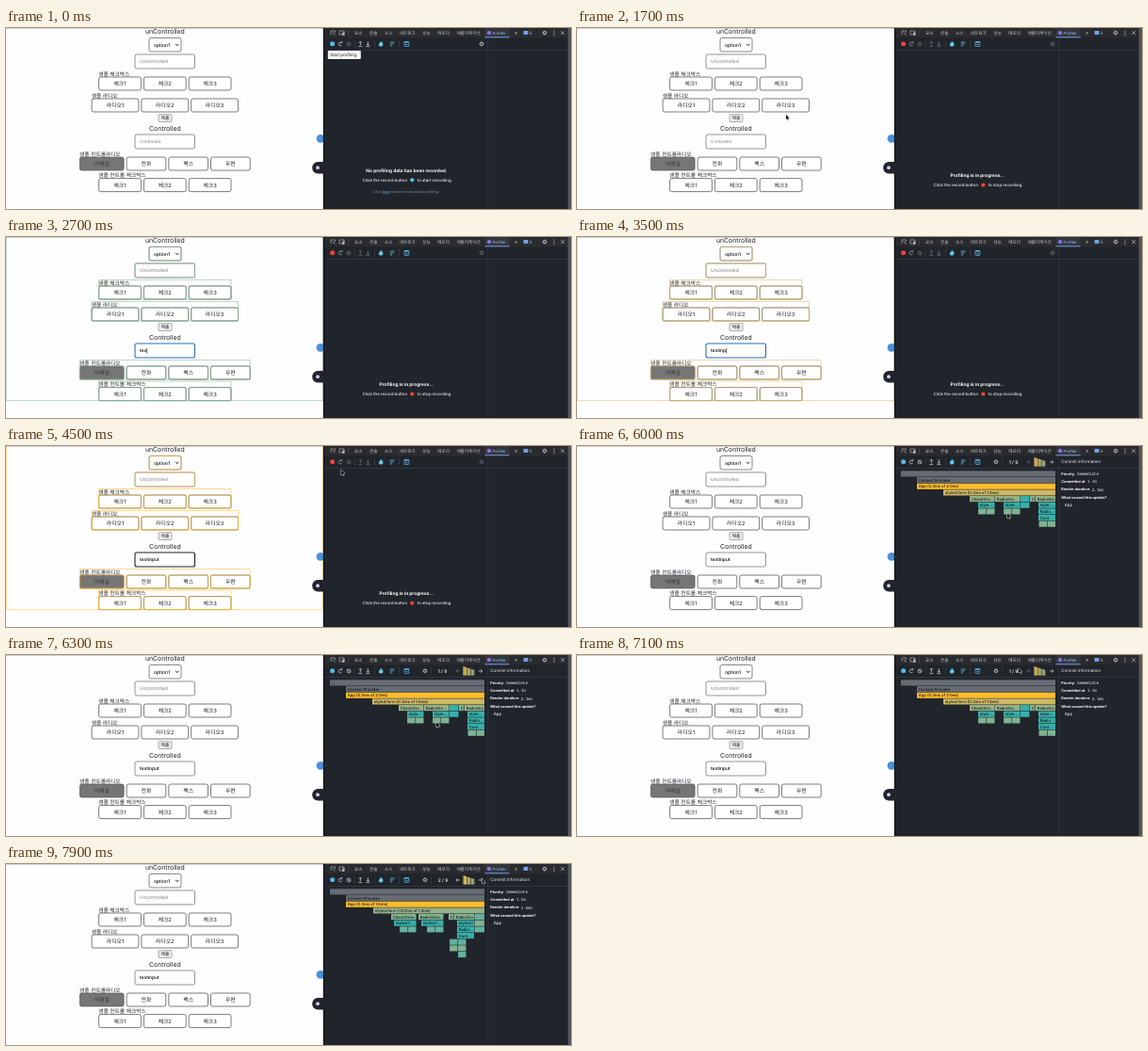
These frames come from a looping animation (600x192 px, 8 s). An HTML page with a canvas:

```html
<!DOCTYPE html>
<html lang="ko">
<head>
<meta charset="utf-8">
<title>Profiler demo</title>
<style>
html, body { margin: 0; width: 100%; height: 100%; overflow: hidden; background: #fff; }
canvas { display: block; width: 600px; height: 192px; }
</style>
</head>
<body>
<canvas id="stage"></canvas>
<script>
const W = 600, H = 192, LOOP = 8000;
const START = 800, TYPE = 2250, STEP = 200, BLUR = 5050, RESULT = 5500, NEXT = 7700;
const WORD = 'textinput', MID = 168.8;
const HEAT = ['#37afa9', '#63b19e', '#80b393', '#97b488', '#abb67d',
  '#beb771', '#cfb965', '#dfba57', '#efbb49', '#febc2c'];
const RED = '#ee4337', BLUE = '#55b8e6', CYAN = '#61c9ea', DIM = '#626973', LIGHT = '#c0c4ca';
const SANS = 'Inter, "Noto Sans CJK KR", "Noto Sans CJK", sans-serif';
const MONO = '"Noto Sans Mono", monospace';

const canvas = document.getElementById('stage');
const dpr = window.devicePixelRatio || 1;
canvas.width = W * dpr;
canvas.height = H * dpr;
const c = canvas.getContext('2d');

function fill(x, y, w, h, color) {
  c.fillStyle = color;
  c.fillRect(x, y, w, h);
}

function line(color, width, ...pts) {
  c.strokeStyle = color;
  c.lineWidth = width;
  c.beginPath();
  for (let i = 0; i < pts.length; i += 2) c.lineTo(pts[i], pts[i + 1]);
  c.stroke();
}

function dot(x, y, r, color) {
  c.fillStyle = color;
  c.beginPath();
  c.arc(x, y, r, 0, 7);
  c.fill();
}

function ring(x, y, r, color, width = 0.8, from = 0, to = 6.29) {
  c.strokeStyle = color;
  c.lineWidth = width;
  c.beginPath();
  c.arc(x, y, r, from, to);
  c.stroke();
}

function box([x, y, w, h], r, bg, edge, width = 0.7) {
  c.beginPath();
  c.roundRect(x, y, w, h, r);
  if (bg) { c.fillStyle = bg; c.fill(); }
  if (edge) { c.strokeStyle = edge; c.lineWidth = width; c.stroke(); }
}

// y is the vertical centre; returns the right edge
function text(s, x, y, size, color, { weight = 400, align = 'left', font = SANS } = {}) {
  c.font = `${weight} ${size}px ${font}`;
  c.fillStyle = color;
  c.textAlign = align;
  c.textBaseline = 'alphabetic';
  c.fillText(s, x, y + size * 0.36);
  return x + c.measureText(s).width;
}

const centred = { align: 'center' };

// A titled row of equal buttons centred on the page; a picked first button is wider
function group(title, y, w, names, picked = false) {
  const gap = 3, extra = picked ? 5 : 0;
  const total = names.length * (w + gap) - gap + extra;
  const left = MID - total / 2;
  const cells = names.map((name, i) => i ? [left + extra + i * (w + gap), y, w, 14] : [left, y, w + extra, 14]);
  return { title, y, names, picked, cells, frame: [left, y - 6.5, total, 20.5] };
}

const CHECKS = [1, 2, 3].map(i => '체크' + i);
const RADIOS = [1, 2, 3].map(i => '라디오' + i);
const GROUPS = [
  group('샘플 체크박스', 52, 44.8, CHECKS),
  group('샘플 라디오', 75, 49.8, RADIOS),
  group('샘플 컨트롤라디오', 137, 41.7, ['이메일', '전화', '팩스', '우편'], true),
  group('샘플 컨트롤 체크박스', 159.6, 44.8, CHECKS)
];
const SELECT = [152, 10.5, 34, 14.5];
const FREE = [137, 28, 63.5, 15];
const BOUND = [137, 113, 63.5, 15];

function page(t) {
  fill(0, 0, 337, H, '#fefdff');
  fill(0, 0, 337, 0.7, '#b9b9bc');
  text('unControlled', MID, 4, 6.9, '#222', centred);
  box(SELECT, 2, '#fff', '#555');
  text('option1', 157, 17.8, 5, '#111', { weight: 500 });
  line('#111', 1, 180.2, 17, 181.8, 18.6, 183.4, 17);
  box(FREE, 2, '#fff', '#666');
  text('Uncontrolled', 142, 35.7, 4.9, '#777');

  for (const g of GROUPS) {
    text(g.title, g.frame[0] - 0.3, g.y - 3.4, 5.7, '#222');
    g.cells.forEach((r, i) => {
      const on = g.picked && i === 0;
      box(r, 2, on ? '#767676' : '#fff', on ? '#555' : '#444');
      text(g.names[i], r[0] + r[2] / 2, r[1] + r[3] / 2, 5.8, on ? '#333' : '#1a1a1a', centred);
    });
  }

  box([162, 91.7, 14, 7.8], 1, '#efefef', '#777', 0.6);
  text('제출', 169, 95.7, 4.8, '#111', centred);
  text('Controlled', MID, 106.3, 6.9, '#222', centred);

  const count = t < TYPE ? 0 : Math.min(WORD.length, 1 + Math.floor((t - TYPE) / STEP));
  const focus = t >= 2100 && t < 4300;
  const dark = t >= 4300 && t < BLUR;
  box(BOUND, 2, '#fff', focus ? '#2a6fb5' : dark ? '#222' : '#666', focus || dark ? 1.1 : 0.7);
  let end = 142;
  if (count) end = text(WORD.slice(0, count), 142, 120.7, 4.9, '#000', { weight: 500 });
  else text('Controlled', 142, 120.7, 4.5, '#777');
  if (focus) fill(end + 0.2, 118, 0.6, 5.4, '#111');

  if (count && t < 4600) highlight(HEAT[count < WORD.length ? count - 1 : 9]);

  dot(334, 117.3, 4.4, '#4a90d9');
  fill(336.8, 0, 1.4, H, '#111317');
  box([325.2, 142, 14, 12.5], [6, 0, 0, 6], '#22232b');
  dot(331, 148.2, 1.9, '#d5d0f0');
}

function highlight(color) {
  c.globalAlpha = 0.75;
  for (const g of GROUPS) [g.frame, ...g.cells].forEach(r => box(r, 0, null, color));
  [SELECT, FREE, [0.3, -2, 336.2, 175.6]].forEach(r => box(r, 0, null, color));
  c.globalAlpha = 1;
}

function tabs() {
  fill(338, 0, 262, 10.5, '#292b2f');
  line('#aaa', 0.7, 345, 7, 345, 3, 349.5, 3, 349.5, 5);
  line('#aaa', 0.9, 346.8, 4.8, 349.5, 7.4);
  box([354, 3, 5, 4], 0, null, '#aaa');
  fill(357, 4.5, 2.5, 3.5, '#aaa');
  line('#555', 0.5, 363.5, 2, 363.5, 8.5);
  let x = 370;
  for (const s of '요소 콘솔 소스 네트워크 성능 메모리 애플리케이션'.split(' ')) {
    x = text(s, x, 5.2, 4.6, '#c9cbce') + 7.5;
  }
  fill(508.5, 0, 26, 10, '#32363d');
  dot(513, 5.2, 2.1, '#8f6fe0');
  text('Profiler', 516.5, 5.2, 4.2, '#9cc4f8');
  fill(508.5, 9.4, 26, 0.9, '#7cacf8');
  text('»', 540, 4.8, 5.5, '#c9cbce');
  box([549.5, 3, 5, 4], 0.7, '#6ea2f0');
  text('5', 556, 5.2, 4.4, '#c9cbce');
  gear(572, 5.2, LIGHT);
  [3, 5.2, 7.4].forEach(y => dot(582, y, 0.6, LIGHT));
  line(LIGHT, 0.7, 589.3, 3.2, 593, 7);
  line(LIGHT, 0.7, 593, 3.2, 589.3, 7);
}

function gear(x, y, color) {
  ring(x, y, 1.5, color, 0.9);
  for (let i = 0; i < 8; i++) {
    const a = i * Math.PI / 4, u = Math.cos(a), v = Math.sin(a);
    line(color, 0.7, x + u * 1.7, y + v * 1.7, x + u * 2.6, y + v * 2.6);
  }
}

function arrow(x, y, dir, color) {
  line(color, 0.8, x - 2 * dir, y, x + 2 * dir, y);
  line(color, 0.8, x + 0.3 * dir, y - 1.7, x + 2 * dir, y, x + 0.3 * dir, y + 1.7);
}

function toolbar(rec, result, commit) {
  const on = rec ? DIM : LIGHT, ban = result ? LIGHT : DIM;
  const reload = rec ? '#9298a0' : LIGHT;
  fill(338, 23.2, 262, 0.5, '#434851');
  fill(511.6, 10.5, 0.6, H, '#3a3f48');
  dot(346.6, 16.8, 2.5, rec ? RED : BLUE);
  ring(355, 17, 1.9, reload, 0.8, 0.4, 5.4);
  line(reload, 0.8, 354.9, 15.9, 356.8, 15.7, 356.8, 13.9);
  ring(364, 17, 2, ban);
  line(ban, 0.8, 362.6, 15.6, 365.4, 18.4);
  [370, 391, 417.5].forEach(x => fill(x, 13, 0.5, 8, '#434851'));
  for (const d of [1, -1]) {
    const x = 380.3 - 4 * d;
    line(on, 0.9, x, 14.3, x, 18.3);
    line(on, 0.8, x - 1.5, 16.3 - 0.7 * d, x, 16.3 - 2.2 * d, x + 1.5, 16.3 - 0.7 * d);
    line(on, 0.8, x - 2, 19.6, x + 2, 19.6);
  }
  c.fillStyle = CYAN;
  c.beginPath();
  c.moveTo(398.2, 14);
  c.bezierCurveTo(401.5, 16.5, 401, 19.6, 398.2, 19.6);
  c.bezierCurveTo(395.2, 19.6, 395.4, 17, 397, 15.8);
  c.fill();
  for (let i = 0; i < 3; i++) fill(407.7, 14.6 + i * 1.9, 5 - i * 1.3, 1, '#49a6b8');
  box([423, 14.5, 4.8, 5], 0.5, null, '#58a9d8', 0.8);
  fill(423, 14.3, 4.8, 1.5, '#58a9d8');
  fill(424.4, 17, 2, 1.2, '#58a9d8');

  gear(result ? 445 : 505, 16.8, on);
  if (!result) return;
  fill(451.5, 13, 0.5, 8, '#434851');
  text(`${commit} / 9`, 458.7, 17, 4.9, '#fff', { weight: 500 });
  arrow(480, 17, -1, commit > 1 ? LIGHT : DIM);
  for (let i = 0; i < 9; i++) {
    const h = 9.5 - i * 0.45;
    fill(485.5 + i * 1.35, 21.7 - h, 1.1, h, i === commit - 1 ? '#ffe28a' : HEAT[Math.max(4, 9 - i)]);
  }
  arrow(504, 17, 1, LIGHT);
}

function message(rec) {
  const y = rec ? 166.6 : 161.2, verb = rec ? 'stop' : 'start';
  const title = rec ? 'Profiling is in progress...' : 'No profiling data has been recorded.';
  text(title, 425.4, y - 10, 4.85, '#fff', { weight: 700, align: 'center' });
  text('Click the record button', 378.6, y, 4.35, '#eee', { weight: 500 });
  dot(431.3, y, 2.1, rec ? RED : BLUE);
  text(`to ${verb} recording.`, 436.8, y, 4.35, '#eee', { weight: 500 });
  if (rec) return;
  const a = text('Click ', 390, 173.8, 3.75, '#8b919b');
  const b = text('here', a, 173.8, 3.75, CYAN);
  line(CYAN, 0.4, a, 175.8, b, 175.8);
  text(' to learn more about profiling.', b, 173.8, 3.75, '#8b919b');
}

function cell(row, left, right, color, label) {
  const y = 26.4 + row * 6.66, w = right - left;
  fill(left, y, w, 6.1, color);
  if (!label) return;
  c.save();
  c.beginPath();
  c.rect(left, y, w, 6.1);
  c.clip();
  text(label, left + 1.7, y + 3.1, 4.2, '#15191e', { weight: 500 });
  c.restore();
}

function pair(row, right, heat) {
  cell(row, right - 17.4, right - 9, HEAT[heat]);
  cell(row, right - 8.4, right, HEAT[heat]);
}

function branch(left, inset, names, heat) {
  const right = left + 26.5;
  cell(4, left, right, HEAT[heat], names[0]);
  cell(5, left + inset, right, HEAT[0], names[1]);
  pair(6, right, heat - 1);
}

// The tree hangs right-aligned; the second commit is shifted left and one step deeper
function flame(commit) {
  const later = commit === 2;
  const inset = later ? 3 : 9, heat = later ? 2 : 3, style = later ? 'styled.f...' : 'style...';
  const start = later ? 409 : 417, step = later ? 29 : 27, right = later ? 497 : 508;
  cell(0, 344, 508, '#666b74', '…');
  cell(1, 361, 508, '#666b74', 'Context.Provider');
  cell(2, 361, 508, HEAT[9], `App (0.3ms of ${later ? 1.6 : 2.1}ms)`);
  cell(3, later ? 390 : 389, 508, HEAT[later ? 3 : 6], `styled.form (${later ? '<0.1ms of 1.3' : '0.2ms of 1.8'}ms)`);
  ['CheckGroup', 'RadioGroup'].forEach((name, i) =>
    branch(start + i * step, inset, [name.slice(0, later ? 9 : 8) + '...', style], heat));

  cell(4, right - 27, right - 21.5, HEAT[2], 'C...');
  cell(4, right - 21, right, HEAT[heat], 'RadioGro...');
  [style, 'Radio...', 'Cont...'].forEach((name, i) => cell(5 + i, right - 18, right, HEAT[0], name));
  if (later) {
    for (let row = 4; row < 7; row++) cell(row, 497.5, 508, HEAT[row % 2 + 1]);
    pair(8, 488.5, 1);
    pair(9, 488.5, 2);
    cell(10, 480.1, 488.5, HEAT[1]);
  } else {
    for (let row = 4; row < 6; row++) cell(row, 471, 480.5, HEAT[0]);
    pair(8, 508, 2);
  }
}

function details(commit) {
  text('Commit information', 514.3, 16.8, 4.5, '#eee');
  const info = [['Priority:', 'Immediate'], ['Committed at:', commit > 1 ? '1.6s' : '1.4s'],
    ['Render duration:', commit > 1 ? '1.6ms' : '2.1ms'], ['What caused this update?', '']];
  info.forEach(([key, value], i) => {
    const y = 29.8 + i * 8.15;
    const x = text(key, 514.3, y, 3.8, '#fff', { weight: 700 });
    text(value, x + 1.5, y, 4.3, '#fff', { font: MONO, weight: 500 });
  });
  text('App', 517.7, 62, 4.4, '#fff');
}

// Pointer moves: from time, to time, x, y; it rests in between
const HOME = [346, 16];
const MOVES = [
  [1000, 1200, 339, 42], [1400, 1700, 222, 92], [1700, 2000, 166, 119],
  [4100, 4500, 356, 25.5], [4500, 4900, ...HOME], [5500, 5700, 425, 55],
  [5850, 6000, 457, 71.5], [6700, 7100, 469, 14], [7200, 7600, 505.5, 15.5]
];

function pointer(t) {
  if (t < 900 || (t > TYPE && t < 4100)) return;
  let [x, y] = HOME;
  for (const [from, to, nx, ny] of MOVES) {
    const u = Math.min(1, Math.max(0, (t - from) / (to - from)));
    const e = u * u * (3 - 2 * u);
    x += (nx - x) * e;
    y += (ny - y) * e;
  }
  c.save();
  c.translate(x, y);
  c.beginPath();
  [[0, 0], [0, 5], [1.2, 4], [2, 5.8], [2.8, 5.4], [2, 3.7], [3.6, 3.7]].forEach(p => c.lineTo(...p));
  c.closePath();
  c.strokeStyle = '#fff';
  c.lineWidth = 0.9;
  c.stroke();
  c.fillStyle = '#000';
  c.fill();
  c.restore();
}

function draw(t) {
  const rec = t >= START && t < RESULT, result = t >= RESULT;
  const commit = t >= NEXT ? 2 : 1;
  c.setTransform(dpr, 0, 0, dpr, 0, 0);
  c.textRendering = 'geometricPrecision';
  fill(0, 0, W, H, '#20242b');
  tabs();
  toolbar(rec, result, commit);
  if (result) {
    flame(commit);
    details(commit);
  } else {
    message(rec);
  }
  if (t < START) {
    box([341.8, 24, 35, 9], 1, '#f4f4f4');
    text('Start profiling', 344.2, 28.5, 4.4, '#222');
  }
  fill(596.7, 0, 3.3, H, '#54575c');
  page(t);
  pointer(t);
}

const begin = performance.now();
function tick() {
  draw((performance.now() - begin) % LOOP);
  requestAnimationFrame(tick);
}
tick();
</script>
</body>
</html>
```
